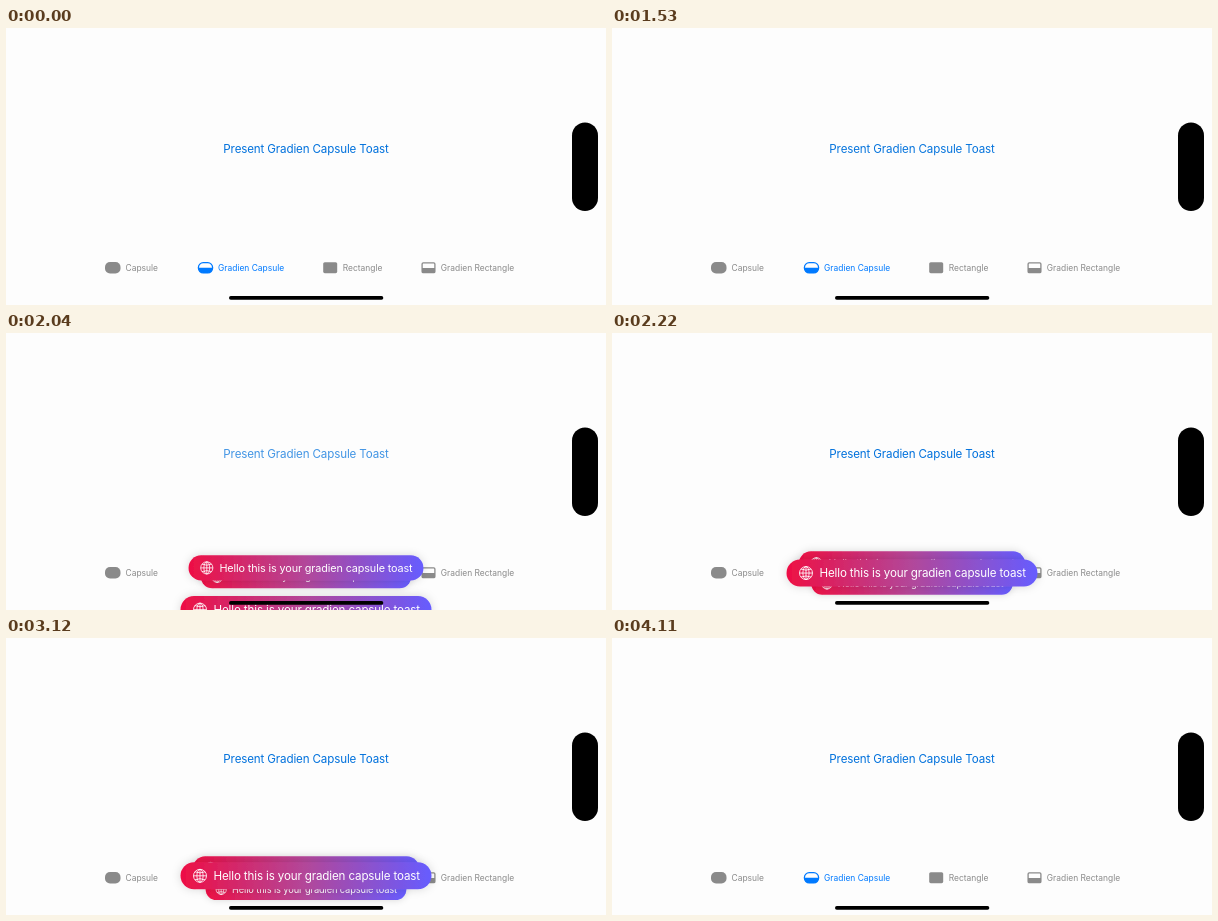
Animation, 600 px wide and 277 px high, one loop 4200 ms. Source, as an HTML page:

```html
<!DOCTYPE html>
<html lang="en">
<head>
<meta charset="utf-8">
<title>Capsule toast</title>
<style>
  html, body { margin: 0; width: 100%; height: 100%; overflow: hidden; background: #fdfdfd; }
  svg { display: block; width: 100%; height: 100%; }
  text { font-family: Inter, "Open Sans", sans-serif; }
  .body { font-size: 11.6px; letter-spacing: -.14px; }
  .tab { font-size: 8.45px; }
  .tab, .icon { fill: #8a8a8a; }
  .on { fill: #007aff; }
  .line { fill: none; stroke: #8a8a8a; stroke-width: 1.3; }
  .line.on { stroke: #007aff; fill: none; }
  .globe { fill: none; stroke: #fff; stroke-width: .85; }
</style>
</head>
<body>
<svg viewBox="0 0 600 277">
  <defs>
    <linearGradient id="fill">
      <stop offset="0" stop-color="#ee0f44"/>
      <stop offset=".5" stop-color="#b2479a"/>
      <stop offset="1" stop-color="#665cff"/>
    </linearGradient>
    <filter id="shadow" x="-10%" y="-80%" width="120%" height="260%">
      <feDropShadow dx="0" dy="0" stdDeviation="4.6" flood-color="#000" flood-opacity=".15"/>
    </filter>
    <g id="toast">
      <rect x="-125.5" y="-13.5" width="251" height="27" rx="13.5" fill="url(#fill)" filter="url(#shadow)"/>
      <g class="globe" transform="translate(-106 0)">
        <circle r="6.5"/>
        <ellipse rx="3.1" ry="6.5"/>
        <path d="M0-6.5V6.5M-6.5 0H6.5M-5.1-4Q0-1.8 5.1-4M-5.1 4Q0 1.8 5.1 4"/>
      </g>
      <text class="body" x="-92.5" y="4.1" fill="#fff">Hello this is your gradien capsule toast</text>
    </g>
  </defs>

  <rect width="600" height="277" fill="#fdfdfd"/>
  <text id="button" class="body" x="300" y="124.8" text-anchor="middle" fill="#0071dc">Present Gradien Capsule Toast</text>

  <rect class="icon" x="99" y="234" width="15.5" height="11.4" rx="5"/>
  <text class="tab" x="119.5" y="242.9">Capsule</text>

  <rect class="line on" x="192.4" y="234.7" width="14.2" height="10.2" rx="4.8"/>
  <path class="on" d="M192.4 239.8H206.6A4.9 5.1 0 0 1 201.7 244.9H197.3A4.9 5.1 0 0 1 192.4 239.8Z"/>
  <text class="tab on" x="212" y="242.9">Gradien Capsule</text>

  <rect class="icon" x="317.2" y="234.2" width="14" height="11" rx="1.6"/>
  <text class="tab" x="336.7" y="242.9">Rectangle</text>

  <rect class="line" x="416.1" y="234.8" width="12.8" height="9.8" rx="1.2"/>
  <path class="icon" d="M416 240H429V244.6H416Z"/>
  <text class="tab" x="434.8" y="242.9">Gradien Rectangle</text>

  <rect x="566" y="94.5" width="26" height="88.5" rx="13"/>
  <g id="stack"></g>
  <rect x="223" y="268.1" width="154.3" height="3.6" rx="1.8"/>
</svg>
<script>
  const LOOP = 4200;
  const TAPS = [1595, 1742, 1932];
  const STAY = 2040;      // time from showing to leaving
  const TRAVEL = 108;     // distance below the resting place
  const REST = 237.8;
  const RATE = 0.02;      // spring frequency per ms

  const button = document.getElementById('button');
  const stack = document.getElementById('stack');
  const toasts = TAPS.map(() => {
    const use = document.createElementNS('http://www.w3.org/2000/svg', 'use');
    use.setAttribute('href', '#toast');
    return stack.appendChild(use);
  });

  const clamp = v => Math.min(1, Math.max(0, v));
  const smooth = v => (v = clamp(v), v * v * (3 - 2 * v));

  // Critically damped spring from 0 to 1
  function spring(ms) {
    if (!(ms > 0)) return 0;
    const x = ms * RATE;
    return 1 - (1 + x) * Math.exp(-x);
  }

  function pressed(t, tap) {
    return t < tap ? smooth((t - tap + 70) / 50) : 1 - smooth((t - tap) / 200);
  }

  function render(t) {
    const dim = Math.max(...TAPS.map(tap => pressed(t, tap)));
    button.setAttribute('opacity', 1 - 0.6 * dim);

    toasts.forEach((toast, i) => {
      const enter = spring(t - TAPS[i]);
      const leave = spring(t - TAPS[i] - STAY);
      const second = spring(t - TAPS[i + 1]);
      const third = spring(t - TAPS[i + 2]);
      const y = REST + TRAVEL * (1 - enter + leave) - 7.5 * second + 21 * third;
      const scale = 1 - 0.1 * (second + third);
      toast.setAttribute('transform', `translate(300 ${y.toFixed(3)}) scale(${scale.toFixed(4)})`);
      toast.setAttribute('visibility', y > 310 ? 'hidden' : 'visible');
    });
  }

  const start = performance.now();
  function tick() {
    render((performance.now() - start) % LOOP);
    requestAnimationFrame(tick);
  }
  render(0);
  requestAnimationFrame(tick);
</script>
</body>
</html>
```
